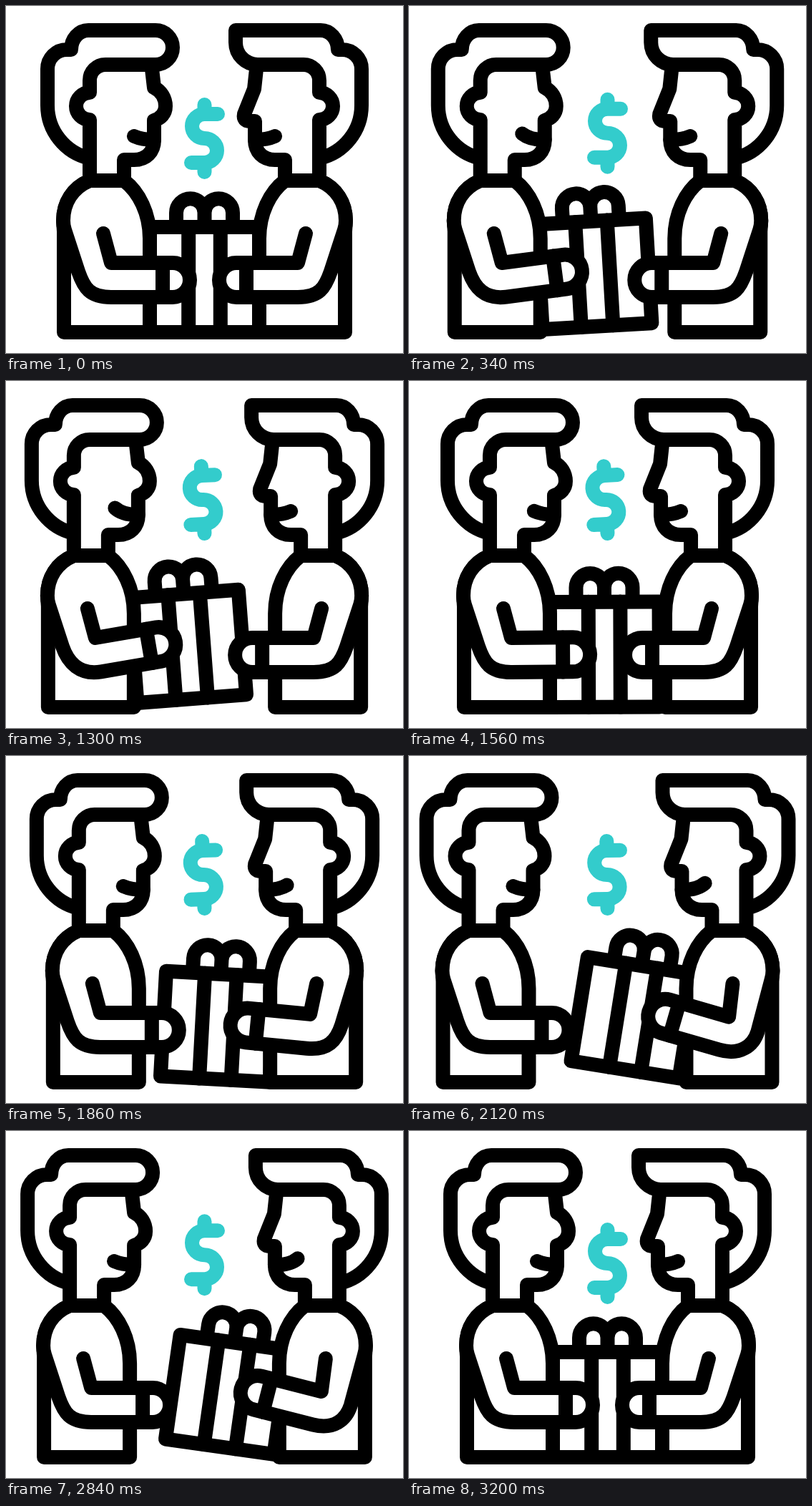
An HTML page with a canvas for the animation above (3.22 s loop, 555 px wide and 485 px high).

```html
<!DOCTYPE html>
<html lang="en">
<head>
<meta charset="utf-8">
<title>Passing a gift</title>
<style>
html, body { margin: 0; width: 100%; height: 100%; overflow: hidden; background: #fff; }
canvas { display: block; }
</style>
</head>
<body>
<canvas id="stage" width="555" height="485"></canvas>
<script>
const ctx = document.getElementById('stage').getContext('2d');
const W = 555, H = 485, LOOP = 3220, STEP = 20;

// Moments of the loop: step apart, come together, swap, apart again, end
const APART = 806, RETURN = 985, SWAP = 1570, APART2 = 2415, RETURN2 = 2580, END = 3200;
const FAR = 45, NEAR = 4;

// Smooth 0 to 1 between two times
function ease(t, from, to) {
  const k = Math.min(1, Math.max(0, (t - from) / (to - from)));
  return k * k * (3 - 2 * k);
}

const pulse = (t, up, top, leave, down) => ease(t, up, top) - ease(t, leave, down);
const rad = deg => deg * Math.PI / 180;

function line(d, filled) {
  const path = new Path2D(d);
  if (filled) {
    ctx.fillStyle = '#fff';
    ctx.fill(path);
  }
  ctx.stroke(path);
}

const backHair = 'M117 213 A76 76 0 0 1 58 139 V88 A27 27 0 0 1 85 61 H91 A24 27 0 0 1 115 34 ';
const nape = ' H139 A22 22 0 0 0 117 104 V121 A19 19 0 0 0 117 159 V244';
const jaw = ' V187 C207 204 196 215 179 215 H165 V244';
const torso = 'M117 244 C93 254 80 275 80 300 L81 315 V456 H201 V325 C201 290 186 260 165 244 Z';

const leftLook = {
  hair: backHair + 'H209 A24 24 0 0 1 209 82' + nape,
  face: 'M204 88 L207 114 C217 119 223 129 223 140 C223 151 216 157 207 160' + jaw,
  bend: 19.5, drop: 0, smile: 9
};
const rightLook = {
  hair: backHair + 'H234 V51 A31 31 0 0 1 203 82' + nape,
  face: 'M205 88 L208 116 L222 151 Q224 161 214 161 H207' + jaw,
  bend: 23, drop: 8, smile: 6
};

function body(look, lift) {
  const s = look.smile * lift;
  line(look.hair);
  line(look.face);
  line(`M${179 - s} ${182 - s} Q${190 - s} ${187 + lift} 207 187`);
  line(torso, true);
}

// The forearm swings about the inner elbow
function arm(look, lift) {
  const a = rad(look.bend * lift), drop = look.drop * lift;
  const ex = 147 - drop, ey = 359 + drop;
  const pt = (x, y) =>
    (ex + x * Math.cos(a) + y * Math.sin(a)).toFixed(2) + ' ' +
    (ey + y * Math.cos(a) - x * Math.sin(a)).toFixed(2);
  line(`M117 244 C93 254 80 275 80 300 Q80 307 82 313 L101 ${371 + 2.5 * drop}
    C${109 - drop / 3} ${394 + 2 * drop} ${pt(-30, 48)} ${pt(0, 48)} L${pt(86, 48)}
    A24 24 0 0 0 ${pt(86, 0)} L${pt(0, 0)} L136 318`, true);
  line(`M${pt(72, 0)} L${pt(72, 48)}`);
}

function person(draw, look, lift, shift, mirrored) {
  ctx.save();
  if (mirrored) {
    ctx.translate(W, 0);
    ctx.scale(-1, 1);
  }
  ctx.translate(-shift, 0);
  draw(look, lift);
  ctx.restore();
}

// The gift follows its holder, sways a little and tips up
function gift(shift, side, left, right) {
  const sway = (p, k) => 3.6 * p - k * p * (1 - p);
  const rise = p => p * (1 + p) / 2;
  ctx.save();
  ctx.translate(277.5 + side * shift + sway(left, 12) - sway(right, 25),
    382.5 - 31 * rise(left) - 28 * rise(right));
  ctx.rotate(rad(13 * right - 8.7 * left));
  line('M-39.5 -73.5 V-93.5 A19.75 19.75 0 0 1 0 -93.5 V-73.5 M0 -93.5 A19.75 19.75 0 0 1 39.5 -93.5 V-73.5', true);
  line('M-76.5 -73.5 H76.5 V73.5 H-76.5 Z', true);
  line('M-22.3 -73.5 V73.5 M22.3 -73.5 V73.5');
  ctx.restore();
}

function dollar(rise, tilt) {
  ctx.save();
  ctx.translate(277.5, 232 - rise);
  ctx.rotate(rad(tilt));
  ctx.strokeStyle = '#33cccc';
  line('M18.5 -81 H0 A17.5 17 0 0 0 0 -47 A17.5 17 0 0 1 0 -13 H-18.5 M0 -94 V-81 M0 -13 V0');
  ctx.restore();
}

function render(t) {
  const shift = FAR * pulse(t, 0, APART, RETURN2, END) -
    (FAR - NEAR) * pulse(t, RETURN, SWAP, SWAP, APART2);
  const left = pulse(t, 0, APART, RETURN, SWAP + 45);
  const right = pulse(t, SWAP + 30, APART2, RETURN2, END);
  const side = 2 * ease(t, SWAP - 10, SWAP + 70) - 1;

  ctx.fillStyle = '#fff';
  ctx.fillRect(0, 0, W, H);
  ctx.strokeStyle = '#000';
  ctx.lineWidth = 20;
  ctx.lineCap = ctx.lineJoin = 'round';
  gift(shift, side, left, right);
  for (const draw of [body, arm]) {
    person(draw, leftLook, left, shift, false);
    person(draw, rightLook, right, shift, true);
  }
  dollar(19 * pulse(t, 0, APART, RETURN2, END), -3.3 * pulse(t, APART, 1450, 1450, APART2));
}

const start = performance.now();
function tick() {
  const t = (performance.now() - start) % LOOP;
  render(Math.floor(t / STEP) * STEP);
  requestAnimationFrame(tick);
}
tick();
</script>
</body>
</html>
```
